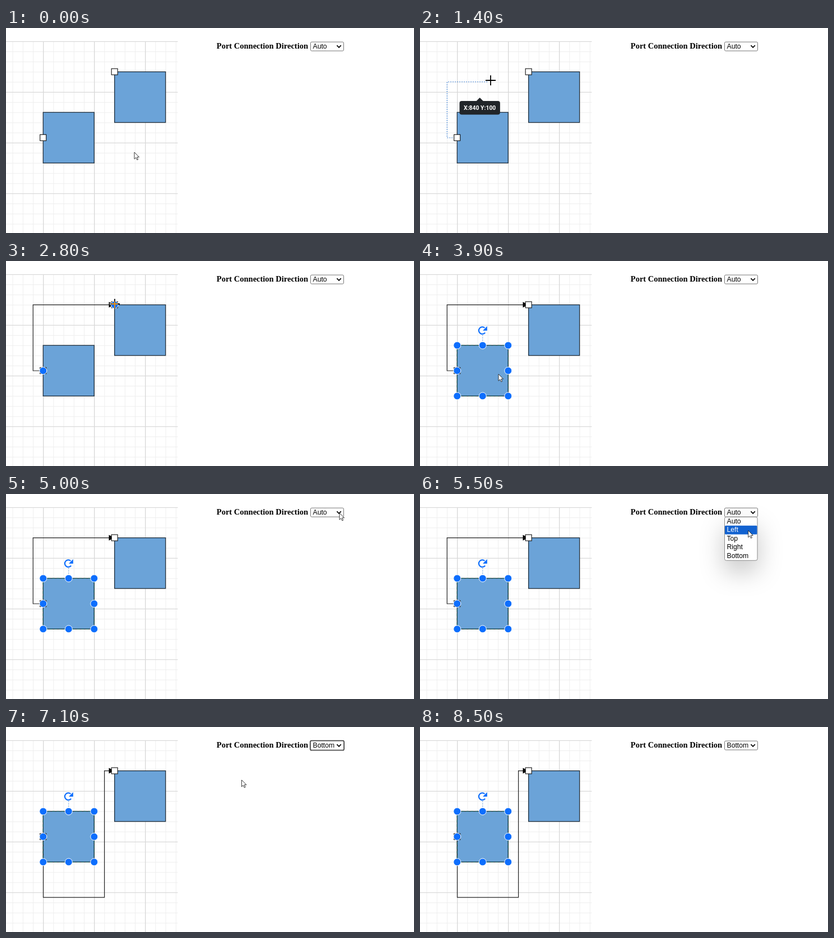
An HTML page for the animation above (8600 ms loop, 728 by 368 pixels).

```html
<!DOCTYPE html>
<html lang="en">
<head>
<meta charset="utf-8">
<title>Port connection direction</title>
<style>
  html, body { margin: 0; width: 100%; height: 100%; overflow: hidden; background: #fff; }
  svg { display: block; isolation: isolate; }
  .label { font: bold 14.5px "Liberation Serif", "Times New Roman", serif; }
  .ui { font: 12.2px "Liberation Sans", Arial, sans-serif; }
  .tip { font: 600 10.4px Roboto, sans-serif; fill: #fff; text-anchor: middle; }
  .node { fill: #6ba3d8; stroke: #1f2d3a; stroke-width: 1.3; }
  .port { fill: #fff; stroke: #111; stroke-width: 1.1; }
  .thumb { fill: #0d6efd; stroke: #fff; stroke-width: 1; }
  .wire { fill: none; stroke: #222; stroke-width: 1.2; }
  .wire.drag { stroke: #3b7fd4; stroke-width: 1.1; stroke-dasharray: 2 2; }
  #cross { fill: none; stroke: #fff; stroke-width: 1.8; mix-blend-mode: difference; }
  #menu > rect:first-child { filter: drop-shadow(0 20px 22px rgba(0, 0, 0, .22)); }
</style>
</head>
<body>
<svg width="728" height="368" viewBox="0 0 728 368">
  <rect width="728" height="368" fill="#fff"/>
  <path id="minor" fill="none" stroke="#eee"/>
  <path id="major" fill="none" stroke="#d9d9d9" stroke-width="1.4"/>

  <rect class="node" x="66.3" y="151.4" width="91" height="91"/>
  <rect class="node" x="193.7" y="78.6" width="91" height="91"/>
  <path id="wire" class="wire"/>
  <path id="head" d="M183.5 73.5L194 78.5L183.5 83.5Z"/>
  <rect class="port" x="60.7" y="191.3" width="11" height="11"/>
  <rect class="port" x="188.2" y="73" width="11" height="11"/>
  <g id="ends">
    <circle class="thumb" cx="66.3" cy="197" r="6.5"/>
    <circle class="thumb" cx="193.7" cy="78.6" r="6.5"/>
  </g>

  <g id="selection">
    <rect x="66.3" y="151.4" width="91" height="91" fill="none" stroke="#0e5a50" stroke-dasharray="5 3"/>
    <path d="M111.8 133V146" stroke="#5b93d6" stroke-dasharray="2 2"/>
    <path d="M116.2 128.6A6.3 6.3 0 1 1 115.4 120" fill="none" stroke="#0d6efd" stroke-width="2.2"/>
    <path d="M119.8 117V125H112Z" fill="#0d6efd"/>
  </g>

  <g id="tip">
    <path d="M0 12L6 18H-6Z" fill="#212529"/>
    <rect x="-36.2" y="18" width="72.4" height="24.5" rx="4" fill="#212529"/>
    <text id="coords" class="tip" y="34.4"></text>
  </g>

  <text class="label" x="375.8" y="37.2">Port Connection Direction</text>
  <rect id="ring" x="542.7" y="24.3" width="60.6" height="17.6" rx="2.5" fill="none" stroke="#222" stroke-width="1.2"/>
  <rect x="543.5" y="25.1" width="59" height="16" rx="2" fill="#fff" stroke="#767676"/>
  <text id="value" class="ui" x="547.5" y="37.2"></text>
  <path d="M590.4 31.2l3.7 3.7l3.7-3.7" fill="none" stroke="#111" stroke-width="1.9"/>
  <g id="menu">
    <rect x="543.5" y="41.3" width="58.5" height="78" rx="3" fill="#fff" stroke="#8a8a8a"/>
    <rect id="hover" x="544" width="57.5" height="15.6" rx="1.5" fill="#1262d0"/>
  </g>

  <path id="arrow" d="M0 0V12.2L2.8 9.6L4.8 13.8L6.7 13L4.8 8.8H8.6Z" fill="#fff" stroke="#222" stroke-width=".9"/>
  <path id="cross" d="M-9 0H9M0-9V9"/>
</svg>
<script>
const $ = id => document.getElementById(id);
const set = (id, attrs) => { for (const k in attrs) $(id).setAttribute(k, attrs[k]); };
const show = (id, on) => { $(id).style.display = on ? '' : 'none'; };
const move = (id, [x, y]) => set(id, { transform: `translate(${x} ${y})` });

const LOOP = 8600, STEP = 100, CELL = 18.2, ROW = 15.6;
const options = ['Auto', 'Left', 'Top', 'Right', 'Bottom'];

// Pointer and tooltip waypoints: time, x, y
const pointer = [
  [0, 229, 223], [300, 175, 228], [800, 66, 195], [1100, 66, 195], [1400, 126, 94],
  [1900, 194, 77], [2800, 194, 77], [3000, 223, 73], [3100, 223, 73], [3700, 140, 203],
  [3900, 140, 203], [4700, 600, 31], [4800, 600, 31], [5000, 595, 34], [5100, 595, 34],
  [6000, 574, 105], [6700, 574, 105], [6900, 545, 117], [7600, 109, 40], [7700, 35, 16]
];
const tipPath = [[1200, 84, 160], [1400, 106.7, 113], [1900, 179, 79]];

function along(path, t) {
  const i = path.findIndex(p => p[0] > t);
  if (i < 0) return path[path.length - 1].slice(1);
  if (i === 0) return path[0].slice(1);
  const [a, b] = [path[i - 1], path[i]];
  const k = (t - a[0]) / (b[0] - a[0]);
  return [a[1] + (b[1] - a[1]) * k, a[2] + (b[2] - a[2]) * k];
}

function grid() {
  const d = { minor: '', major: '' };
  for (let i = -3; i < 14; i++)
    d[i % 5 ? 'minor' : 'major'] += `M${66.7 + i * CELL} 24V368`;
  for (let i = 0; i < 19; i++)
    d[i % 5 ? 'minor' : 'major'] += `M0 ${24.4 + i * CELL}H306.5`;
  for (const id in d) set(id, { d: d[id] });
}

function build() {
  grid();
  for (const x of [0, 1, 2]) for (const y of [0, 1, 2]) {
    if (x === 1 && y === 1) continue;
    $('selection').insertAdjacentHTML('beforeend',
      `<circle class="thumb" cx="${66.3 + x * 45.5}" cy="${151.4 + y * 45.5}" r="6.5"/>`);
  }
  options.forEach((name, i) => $('menu').insertAdjacentHTML('beforeend',
    `<text class="ui" x="547.5" y="${52.6 + i * ROW}">${name}</text>`));
}

function draw(t) {
  const [x, y] = along(pointer, t);
  const drag = t >= 1200 && t < 2800, bottom = t >= 6300;

  // The dragged end snaps to the grid
  const col = Math.round((x - 66.5) / CELL), row = Math.round((y - 78.8) / CELL);
  const endX = drag ? 66.5 + col * CELL : 193.7;
  const endY = drag ? 78.6 + row * CELL : 78.6;
  show('wire', t >= 1200);
  set('wire', {
    class: drag ? 'wire drag' : 'wire',
    d: bottom ? 'M66.5 197V305.8H175.6V78.6H193.7' : `M66.3 197H48.3V${endY}H${endX}`
  });
  show('head', t >= 2800);
  show('ends', t >= 2800 && t < 3900);
  show('selection', t >= 3900);

  show('tip', t >= 1200 && t < 2200);
  move('tip', along(tipPath, t));
  set('tip', { opacity: t < 2100 ? 1 : 0.4 });
  $('coords').textContent = `X:${780 + col * 20} Y:${80 + row * 20}`;

  show('ring', bottom && t < 8500);
  $('value').textContent = options[bottom ? 4 : 0];
  const open = t >= 5200 && !bottom;
  const picked = Math.max(0, Math.min(4, Math.floor((y - 41) / ROW)));
  show('menu', open);
  set('hover', { y: 41.2 + picked * ROW });
  document.querySelectorAll('#menu text').forEach((el, i) =>
    el.setAttribute('fill', i === picked ? '#fff' : '#000'));

  const cross = t >= 700 && t < 2900;
  show('cross', cross);
  show('arrow', !cross && t < 7800);
  move('cross', [x, y]);
  move('arrow', [x, y]);
}

build();
const start = performance.now();
(function tick() {
  const t = (performance.now() - start) % LOOP;
  draw(Math.floor(t / STEP) * STEP);
  requestAnimationFrame(tick);
})();
</script>
</body>
</html>
```
